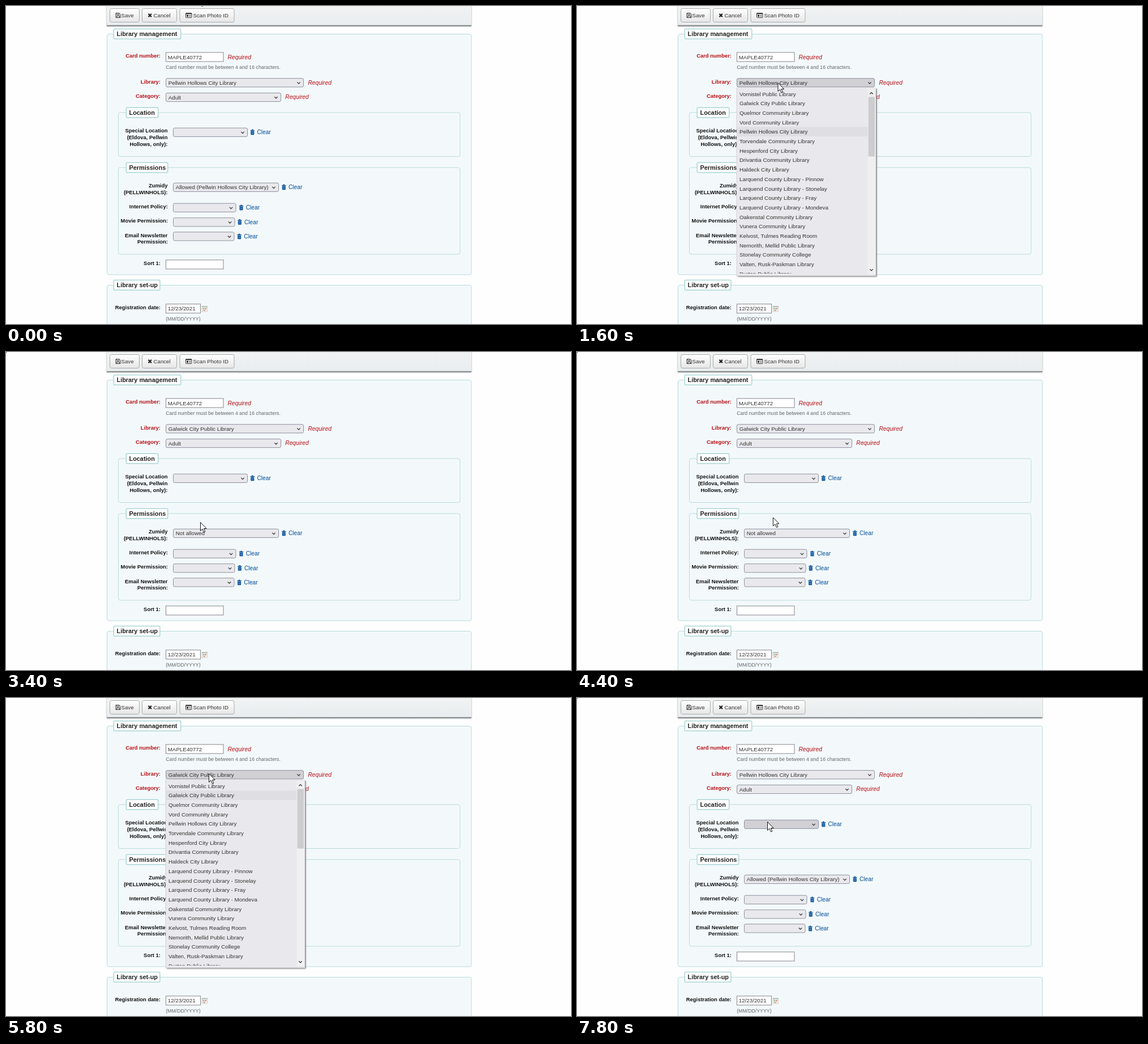
These frames come from a looping animation (998 px wide and 561 px high, 8000 ms). An HTML page:

```html
<!DOCTYPE html>
<html lang="en">
<head>
<meta charset="utf-8">
<title>Library card form</title>
<style>
html, body { margin: 0; width: 100%; height: 100%; overflow: hidden; background: #fefefe; }
svg { display: block; width: 998px; height: 561px; }
text { font: 9.8px "Liberation Sans", Arial, sans-serif; fill: #333; white-space: pre; }
.label { font-size: 9.45px; font-weight: bold; fill: #111; text-anchor: end; }
.need { fill: #b80f14; }
.req { font-size: 10.2px; font-style: italic; fill: #b80f14; }
.hint { font-size: 8.78px; fill: #666; }
.legend { font-size: 10.88px; font-weight: bold; fill: #222; }
.link { font-size: 10.2px; fill: #004d99; }
.btn { font-size: 9.7px; }
</style>
</head>
<body>
<svg id="stage" viewBox="0 0 998 561" xmlns="http://www.w3.org/2000/svg">
  <defs>
    <linearGradient id="bar" x2="0" y2="1"><stop stop-color="#f1f3f3"/><stop offset="1" stop-color="#e9edef"/></linearGradient>
    <linearGradient id="btn" x2="0" y2="1"><stop stop-color="#fff"/><stop offset="1" stop-color="#e6e6e6"/></linearGradient>
    <filter id="blur" x="-10%" y="-10%" width="120%" height="120%"><feGaussianBlur stdDeviation="1.3"/></filter>
    <clipPath id="rows"><rect x="282" y="145" width="232" height="327"/></clipPath>
  </defs>
</svg>
<script>
const stage = document.getElementById('stage');

function add(tag, attrs, parent = stage) {
  const el = document.createElementNS('http://www.w3.org/2000/svg', tag);
  for (const k in attrs) el.setAttribute(k, attrs[k]);
  return parent.appendChild(el);
}
const rect = (x, y, width, height, fill, more = {}, parent) =>
  add('rect', { x, y, width, height, fill, ...more }, parent);
const path = (d, more = {}, parent) => add('path', { d, fill: 'none', ...more }, parent);
function text(str, x, y, cls = '', parent) {
  const el = add('text', { x, y, class: cls }, parent);
  el.textContent = str;
  return el;
}

// ---- building blocks ----
const fieldset = (x, y, w, h) => rect(x, y, w, h, '#f3f9fb', { stroke: '#b9dadb', rx: 3.5 });

function legend(str, x, y, w) {
  rect(x, y, w, 17.6, '#fff', { stroke: '#abd6d5', 'stroke-width': 1.5, rx: 1.5 });
  text(str, x + 5.2, y + 12.7, 'legend');
}

function button(str, x, w, textX) {
  rect(x, 4.5, w, 24, 'url(#btn)', { stroke: '#a9abac', rx: 3 });
  text(str, textX, 20, 'btn');
}

const input = (x, y, w, str = '') => {
  rect(x, y, w, 16, '#fff', { stroke: '#85858c' });
  text(str, x + 3.2, y + 11.6);
};

const chevron = (x, y, dir = 1, parent) =>
  path(`M${x - 2.7} ${y - 1.3 * dir}l2.7 ${2.7 * dir}l2.7 ${-2.7 * dir}`,
    { stroke: '#333', 'stroke-width': 1.3 }, parent);

function select(x, y, w, str = '') {
  const box = rect(x, y, w, 15.2, '#e9e9ed', { stroke: '#8f8f9d', rx: 2.5 });
  const label = text(str, x + 4.2, y + 11.1);
  chevron(x + w - 8.5, y + 8);
  return {
    label,
    has: (px, py) => px >= x && px <= x + w && py >= y && py <= y + 15.2,
    hover: on => box.setAttribute('fill', on ? '#d0d0d5' : '#e9e9ed')
  };
}

function clearLink(x, y) {
  path(`M${x} ${y - 3.2}h7.6M${x + 2.4} ${y - 4.3}h2.8`, { stroke: '#004d99', 'stroke-width': 1.3 });
  rect(x + .8, y - 2, 6, 6.4, '#004d99', { rx: .8 });
  path(`M${x + 2.7} ${y - .8}v4M${x + 4.9} ${y - .8}v4`, { stroke: '#a9c4de', 'stroke-width': .7 });
  text('Clear', x + 12, y + 3.6, 'link');
}

// ---- toolbar ----
rect(178, 0, 644, 36, '#8b8f91', { filter: 'url(#blur)' });
rect(178, -2, 644, 36, 'url(#bar)');
rect(178, 33.8, 644, 1.4, '#777c7f');
button('Save', 183.5, 52, 203.5);
button('Cancel', 240.5, 61, 260.5);
button('Scan Photo ID', 307, 96, 330.5);
path('M194 12.5h6l2 2v6h-8zM196 12.8v2.7h3.6v-2.7M195.8 20.3v-2.8h4.5v2.8', { stroke: '#333' });
path('M251.5 13.8l5.4 5.4M256.9 13.8l-5.4 5.4', { stroke: '#222', 'stroke-width': 2.3 });
rect(317.5, 12.7, 10.4, 7.8, '#fff', { stroke: '#333', rx: .8 });
rect(317.5, 12.3, 10.4, 2, '#333');
rect(319.1, 15.4, 3, 3.6, '#333');
path('M323.3 16.3h3.2M323.3 18.3h3.2', { stroke: '#333', 'stroke-width': .9 });

// ---- form ----
const home = 'Pellwin Hollows City Library', other = 'Galwick City Public Library';

fieldset(178.5, 49.5, 643.5, 424.5);
fieldset(198.5, 188, 603.5, 77.5);
fieldset(198.5, 285, 603.5, 153);
fieldset(178.5, 492.5, 643.5, 90);
legend('Library management', 190.3, 40.4, 118.4);
legend('Location', 212.3, 179.2, 56.4);
legend('Permissions', 212.3, 276.2, 73.4);
legend('Library set-up', 190.3, 483.6, 81.6);

[['Card number:', 273, 91.3, 1], ['Library:', 273, 137.2, 1], ['Category:', 273, 162, 1],
 ['Special Location', 285.5, 223.4], ['(Eldova, Pellwin', 285.5, 235.4], ['Hollows, only):', 285.5, 246.8],
 ['Zumidy', 285.5, 320.4], ['(PELLWINHOLS):', 285.5, 332.2], ['Internet Policy:', 286, 357.4],
 ['Movie Permission:', 286, 382.4], ['Email Newsletter', 285.5, 407.8], ['Permission:', 286, 419.2],
 ['Sort 1:', 273, 457], ['Registration date:', 273, 534.6]
].forEach(([str, x, y, need]) => text(str, x, y, need ? 'label need' : 'label'));

input(282.5, 82, 101.5, 'MAPLE40772');
text('Card number must be between 4 and 16 characters.', 282.2, 111.4, 'hint');
input(282.5, 448, 101.5);
input(282.5, 525.8, 61, '12/23/2021');
text('(MM/DD/YYYY)', 282.2, 554.8, 'hint');
[[391.5, 93.8], [533.5, 138.8], [493.3, 164.4]].forEach(([x, y]) => text('Required', x, y, 'req'));

rect(346, 529.5, 9.5, 9.5, '#f4f4f0', { stroke: '#c4c8c4', 'stroke-width': .8 });
rect(346, 529.5, 9.5, 2.2, '#b9c6bd');
rect(347.5, 533, 2.6, 2, '#86b89a');
rect(350.8, 533, 3.2, 2, '#e08a78');
rect(348.4, 536, 3.6, 2, '#e3a08c');

const library = select(282.5, 127.7, 243, home);
const stream = select(295.5, 312.2, 186);
const selects = [
  library, stream,
  select(282.5, 153.4, 203, 'Adult'),
  select(295.5, 215.2, 131),
  select(295.5, 348.2, 110.5),
  select(295.5, 373.7, 108.5),
  select(295.5, 398.8, 107.5)
];
[[431.5, 222.8], [487, 319.8], [411.7, 355.8], [409, 381.3], [408.3, 406.8]]
  .forEach(([x, y]) => clearLink(x, y));

// ---- drop-down list ----
const names = [
  'Vornistel Public Library', other, 'Quelmor Community Library', 'Vord Community Library', home,
  'Torvendale Community Library', 'Hespenford City Library', 'Drivantia Community Library',
  'Haldeck City Library', 'Larquend County Library - Pinnow', 'Larquend County Library - Stonelay',
  'Larquend County Library - Fray', 'Larquend County Library - Mondeva', 'Oakenstal Community Library',
  'Vunera Community Library', 'Kelvost, Tulmes Reading Room', 'Nemorith, Mellid Public Library',
  'Stonelay Community College', 'Valten, Rusk-Paskman Library', 'Durten Public Library'
];
const rowTop = 147, rowH = 16.68;
const popup = add('g', {});
rect(284, 146, 245.5, 331.5, '#777', { filter: 'url(#blur)' }, popup);
rect(282, 144, 246, 332, '#e9e9ed', {}, popup);
path('M282 144V476H528', { stroke: '#c9c9ce', 'stroke-width': .8 }, popup);
const mark = rect(282.5, rowTop, 231, rowH, '#dedee3', {}, popup);
const list = add('g', { 'clip-path': 'url(#rows)' }, popup);
names.forEach((name, i) => text(name, 287, 158.7 + i * rowH, '', list));
rect(513.5, 146, 13.5, 327, '#f0f0f1', {}, popup);
rect(514.5, 160.5, 11.5, 105, '#cdcdcf', {}, popup);
chevron(520, 154, -1, popup);
chevron(520, 465.5, 1, popup);

// ---- pointer ----
const dot = rect(0, 0, 1.2, 1, '#222');
const pointer = path('M0 0V15L3.5 11.8L6 17.6L8.4 16.6L5.9 11H10.6Z',
  { fill: '#fff', stroke: '#111', 'stroke-width': 1, 'stroke-linejoin': 'round' });

// time, x, y of the pointer tip
const route = [
  [0, 340, -17], [1200, 355, 135.5], [1600, 355, 135.5], [2200, 347, 170], [2400, 347, 170],
  [3400, 343.5, 300.5], [3600, 341, 323], [3800, 340.5, 322], [4200, 340.5, 322],
  [5200, 370, 171.5], [5400, 358.5, 133.5], [6000, 358.5, 133.5], [7200, 336.5, 218.5], [8000, 336.5, 218.5]
];
const LOOP = 8000, STEP = 200;
const within = (t, a, b) => t >= a && t < b;

function tipAt(t) {
  const i = route.findIndex(k => k[0] > t);
  const [t0, x0, y0] = route[i - 1], [t1, x1, y1] = route[i];
  const p = (t - t0) / (t1 - t0);
  return [x0 + (x1 - x0) * p, y0 + (y1 - y0) * p];
}

function draw(t) {
  const [x, y] = tipAt(t);
  const open = within(t, 1400, 2400) || within(t, 5600, 7600);
  const held = open || t === 2400 || t === 7600;
  const away = within(t, 2400, 7600);
  const chosen = away ? other : home;

  pointer.setAttribute('transform', `translate(${x} ${y})`);
  library.label.textContent = chosen;
  stream.label.textContent = away ? 'Not allowed' : `Allowed (${home})`;
  selects.forEach(s => s.hover(held ? s === library : s.has(x, y)));

  const row = y >= rowTop ? Math.floor((y - rowTop) / rowH) : names.indexOf(chosen);
  mark.setAttribute('y', rowTop - .2 + row * rowH);
  popup.setAttribute('visibility', open ? 'visible' : 'hidden');
  dot.setAttribute('visibility', within(t, 2000, 4800) || t >= 6600 ? 'visible' : 'hidden');
}

const start = performance.now();
function tick() {
  const t = (performance.now() - start) % LOOP;
  draw(Math.floor(t / STEP) * STEP);
  requestAnimationFrame(tick);
}
tick();
</script>
</body>
</html>
```
